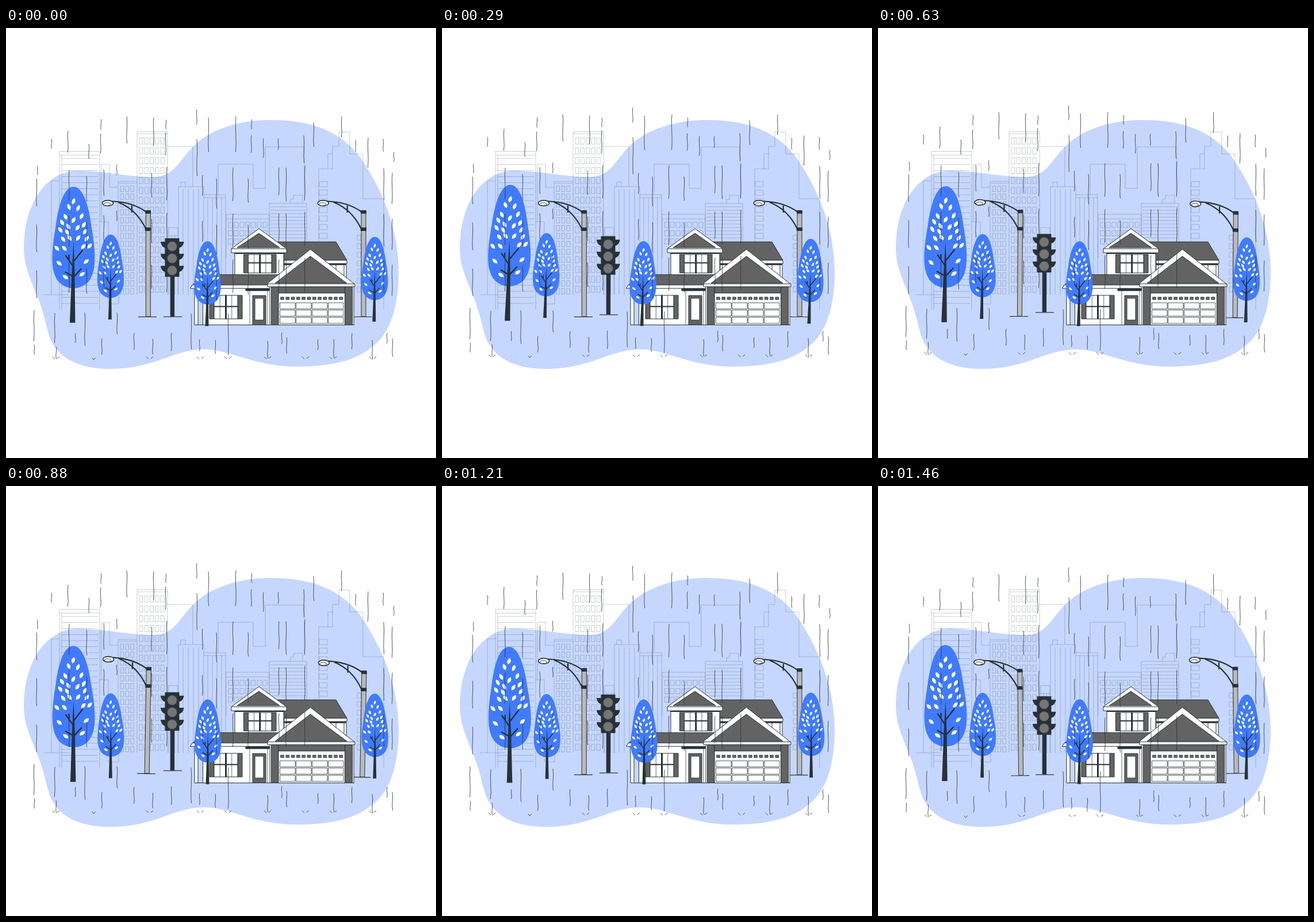
Recreate the animation shown at these times as an HTML page. Size 748 by 748 pixels, loop 1500 ms.

```html
<!DOCTYPE html>
<html lang="en">
<head>
<meta charset="utf-8">
<title>Rainy street</title>
<style>
html, body { margin: 0; width: 100%; height: 100%; overflow: hidden; background: #fff; }
svg { display: block; width: 100vw; height: 100vh; }
</style>
</head>
<body>
<svg id="stage" viewBox="0 0 748 748" xmlns="http://www.w3.org/2000/svg"></svg>
<script>
const INK = '#263238', BLUE = '#407bff', ROOF = '#636363', WHITE = '#fff';
const range = (n, fn) => Array.from({ length: n }, (_, i) => fn(i)).join('');
const path = (d, attrs = '') => `<path d="${d}" ${attrs}/>`;
const box = (x, y, w, h) => `M${x} ${y}h${w}v${h}h${-w}z`;
const fill = (d, color) => path(d, `fill="${color}"`);
const grid = (x, y, cols, rows, dx, dy, w, h) =>
  range(rows, r => range(cols, c => box(x + c * dx, y + r * dy, w, h)));
const rows = (x, w, y, dy, n) => range(n, i => `M${x} ${y + i * dy}h${w}`);
const posts = (y, h, x, dx, n) => range(n, i => `M${x + i * dx} ${y}v${h}`);

const BLOB = 'M31 381C32 300 74 247 127 248C180 250 215 259 255 259C300 259 300 223 341 193' +
  'C375 169 420 160 461 160C535 160 582 182 614 222C655 280 683 350 683 425C683 485 668 530 640 552' +
  'C610 579 565 589 507 589C430 589 390 559 345 559C290 559 260 593 181 593C125 593 88 573 75 535' +
  'C67 508 66 495 54 466C42 434 31 415 31 381Z';

function city() {
  const d = [
    'M93 490V214.5H163V490M93 221H163M97 221V490M79 464V266H93M66 464H110',
    rows(97, 63, 227, 10.5, 25),
    'M166 337V237H180V277H195M163 337H178V480H196V464',
    'M195 464V267H228M195 270H228', grid(199, 275, 3, 14, 9, 13.7, 5.5, 9.5),
    'M228 464V180.5H281V464M228 184H281', grid(232, 191, 5, 16, 9.3, 17.2, 6, 11),
    'M281 206H325V276M283 464V347H299V464M283 361H299', posts(361, 103, 288, 5.5, 2),
    'M300 464V276H344V464M304 276V268H312V276', posts(281, 183, 308, 9, 4),
    'M344 290H382V440M344 295H382', posts(295, 140, 351, 8, 4),
    'M369 290V237H430V279H451V207H519V295',
    'M383 400V324H458V372M383 332H458', grid(387, 338, 7, 3, 10, 14.5, 7, 9),
    'M458 370V305H523V372M495 305V298H500V291H516V305', rows(460, 62, 311, 6, 10),
    'M544 372V245H568V206H579V181H598V219H621V297H657V490M560 245V219H569', grid(545, 267, 1, 7, 1, 15, 14, 9),
    grid(611, 360, 1, 7, 1, 15, 6, 9)
  ].join('');
  return path(d, `fill="none" stroke="${INK}" stroke-width=".8" opacity=".3"`);
}

function lamp(dx) {
  return `<g transform="translate(${dx})" stroke="${INK}">` +
    path('M230 502.5H262', 'stroke-width="1.2"') +
    path(box(243.3, 319, 8, 183), 'fill="#bababa" stroke-width="1"') +
    fill(box(243, 317.5, 8.6, 5) + box(242.5, 347.5, 9.2, 5), INK) +
    path('M184 301.5C205 302 226 307 244 320M195 303C220 313 234 330 243 349M219 309V321',
      'fill="none" stroke-width="2.2"') +
    `<ellipse cx="177" cy="304.7" rx="9.5" ry="4.8" fill="#fff" stroke-width="1.6"/>` +
    `<ellipse cx="176" cy="306.5" rx="6" ry="2.6" fill="#fff" stroke-width=".9"/></g>`;
}

function trafficLight() {
  return fill(box(285.7, 430, 7.4, 72) + box(276.5, 366, 25, 67), INK) +
    path('M274 502.5H306', `stroke="${INK}" stroke-width="1.2"`) +
    range(3, i => {
      const y = 372 + i * 21;
      return fill(`M269 ${y}H309.5C309 ${y + 6} 305 ${y + 10} 300 ${y + 11}H278C273 ${y + 10} 269.5 ${y + 6} 269 ${y}z`, INK) +
        `<circle cx="289" cy="${y + 8}" r="8.3" fill="#757575" stroke="#55585a" stroke-width=".8"/>`;
    });
}

function windowPair(x, y, w, h, bar) {
  const m = x + w / 2;
  return fill(box(x - 8, y, 8, h) + box(x + w, y, 8, h), ROOF) + fill(box(x, y, w, h), WHITE) +
    fill(box(m - 1, y, 2, h) + box(x, y + bar, w, 1), INK) +
    path(posts(y, h, x + w / 4, w / 2, 2), 'stroke-width=".7"');
}

function house() {
  const dashes = range(12, i => box(477.5 + i * 9.3, 468, 6, 4.5));
  return `<g stroke="${INK}" stroke-width="1">` +
    // right wing
    fill('M484 404H592V438L600 446H484z', WHITE) +
    fill('M460 372H574L593 404H484z', ROOF) +
    fill(box(484, 404, 109, 6), WHITE) + fill(box(484, 410, 107, 2), INK) +
    path(posts(412, 26, 574, 14, 2)) +
    // upper storey
    fill(box(398, 389, 85, 41), WHITE) + windowPair(421.5, 394, 40.5, 32, 14) +
    fill(box(398, 390, 85, 2.5), INK) +
    fill('M440 349L392 384V391H488V384z', WHITE) +
    fill('M440 357L402 382H476z', ROOF) + path('M392 384H488', '') +
    // lower left
    fill(box(328, 450, 6, 66.5), WHITE) + fill(box(342.5, 450, 117, 66.5), WHITE) +
    fill('M342 429H486L462 448H324z', ROOF) +
    fill('M320.5 453L324 447H461V453z', WHITE) + fill(box(417, 453.5, 41, 3.5), INK) +
    windowPair(362, 465, 41, 41, 19) +
    fill(box(429, 465.5, 23, 51), ROOF) + fill(box(433, 470, 15, 38), WHITE) +
    path(posts(457, 59, 424, 31, 2), 'stroke-width=".7"') +
    // garage
    fill(box(459, 449, 146, 67.5), WHITE) + fill(box(461.5, 450, 12.5, 66.5) + box(589.5, 450, 13, 66.5), ROOF) +
    fill(box(474, 450, 115.5, 11), ROOF) + fill(box(474, 461, 115.5, 55.5), WHITE) +
    path(dashes, `fill="${ROOF}" stroke-width=".6"`) +
    path(grid(476.5, 478, 4, 3, 28, 12.6, 26.5, 10.6), 'fill="#fff" stroke-width=".8"') +
    fill('M529.5 385L455 444V450H607V446z', WHITE) +
    fill('M529.5 397L468 444H593z', ROOF) + path('M455 445H607') +
    path('M328 516.5H606') + '</g>';
}

// x, y from the crown's top
const LEAVES = [0, 25, -8, 35, 8, 37, -14, 52, 0, 58, 14, 51, -20, 62, -9, 69, 7, 71, 18, 66,
  -23, 75, -11, 79, 20, 78, -18, 91, -7, 89, 8, 89, 23, 90, -29, 107, -16, 107, 17, 104,
  28, 103, -25, 133, 22, 130, 15, 152, -14, 157];

function tree(x, y, s) {
  const leaves = range(LEAVES.length / 2, i => {
    const lx = LEAVES[2 * i], ly = LEAVES[2 * i + 1], a = (lx < 0 ? 1 : -1) * (78 - ly / 3.6);
    return path('M-6 0Q0 -6 6 0Q0 6 -6 0', `fill="#fff" transform="translate(${lx} ${ly}) rotate(${a})"`);
  });
  return `<g transform="translate(${x} ${y}) scale(${s})">` +
    fill('M0 0C16 0 26 30 31 68C38 110 42 148 25 166C11 180 -11 180 -25 166C-42 148 -38 110 -31 68C-26 30 -16 0 0 0', BLUE) +
    leaves + fill('M-6.5 236.5L-3 150L0 95L2 150L3 236.5z', INK) +
    path('M-1 138L-14 119M0 130L16 110M-1 156L-15 148M0 157L14 142M-8 128V118', `fill="none" stroke="${INK}" stroke-width="2.4"`) +
    '</g>';
}

// x, y, length
const HIGH = [332, 142, 26, 165, 159, 18, 165, 184, 34, 210, 154, 47, 257, 156, 50, 278, 160, 16, 278, 182, 40,
  352, 156, 60, 400, 154, 62, 427, 159, 17, 427, 187, 30, 79, 193, 17, 108, 179, 38, 144, 202, 26, 584, 154, 36,
  535, 164, 43, 474, 192, 20, 518, 187, 48, 448, 192, 34, 608, 195, 20, 630, 191, 52, 656, 193, 22, 675, 216, 17,
  332, 194, 64, 55, 240, 16];
const MID = [110, 247, 54, 140, 258, 44, 193, 238, 18, 170, 246, 46, 280, 242, 58, 253, 252, 42, 342, 256, 36,
  366, 262, 52, 395, 243, 58, 421, 262, 42, 475, 243, 48, 487, 243, 58, 520, 240, 60, 657, 244, 56, 672, 252, 54, 53, 262, 48];
const LOW = [49, 491, 54, 49, 551, 17, 85, 496, 52, 87, 554, 22, 121, 531, 17, 137, 495, 58, 167, 540, 28, 193, 495, 38,
  223, 531, 29, 255, 541, 27, 288, 530, 32, 322, 497, 62, 337, 542, 20, 364, 543, 24, 387, 497, 72, 455, 545, 30,
  480, 530, 20, 488, 538, 28, 543, 542, 18, 570, 542, 32, 602, 531, 28, 637, 543, 34, 663, 531, 18, 672, 540, 32];

function drops(list, dy = 0) {
  return range(list.length / 3, i => {
    const [x, y, h] = list.slice(3 * i, 3 * i + 3), k = i % 2 ? 1 : -1;
    return `M${x} ${y + dy}c${2 * k} ${h * .35} ${-1.6 * k} ${h * .65} ${.6 * k} ${h}`;
  });
}

function rain() {
  const splashes = [87, 153, 250, 338, 386, 455, 521, 569, 638]
    .map((x, i) => i === 1 ? `M${x - 3} 574l2 3l4 -3` : `M${x - 6} 572l4 4M${x + 6} 572l-4 3`).join('');
  return path(drops(HIGH) + drops(MID) + drops(MID, 80) + drops(MID, 160) + drops(LOW) + splashes,
    `fill="none" stroke="${INK}" stroke-width=".8"`);
}

const group = (id, body) => `<g id="${id}">${body}</g>`;
const stage = document.getElementById('stage');
stage.innerHTML = fill(BLOB, '#c6d7ff') + city() +
  group('lamps', lamp(0) + lamp(374.7)) + group('signal', trafficLight()) + house() +
  group('trees', tree(117.5, 276.5, 1) + tree(182, 359.5, .624) + tree(350.7, 371, .624) + tree(641.5, 363, .624)) +
  group('rain', rain());

const LOOP = 1500, FPS = 24;
const move = (id, value) => document.getElementById(id).setAttribute('transform', value);

// Sway in degrees: up to 1 at a quarter, down to -1 at three quarters
function sway(p) {
  return p < .25 ? 4 * p : p < .75 ? 2 - 4 * p : 4 * p - 4;
}

function draw(ms) {
  const step = Math.floor((ms % LOOP) * FPS / 1000 + .1) % 36;
  const t = (step * 1000 / FPS + 15) / LOOP;
  const lift = -9 * (1 - Math.abs(2 * t - 1));
  move('rain', `translate(0 ${lift})`);
  move('signal', `translate(0 ${lift})`);
  move('trees', `rotate(${sway(t)} 374 374)`);
  move('lamps', `rotate(${t < 1 / 3 ? 0 : sway(t - 1 / 3)} 374 374)`);
}

let start;
function tick(now) {
  start ??= now;
  draw(now - start);
  requestAnimationFrame(tick);
}
draw(0);
requestAnimationFrame(tick);
</script>
</body>
</html>
```
